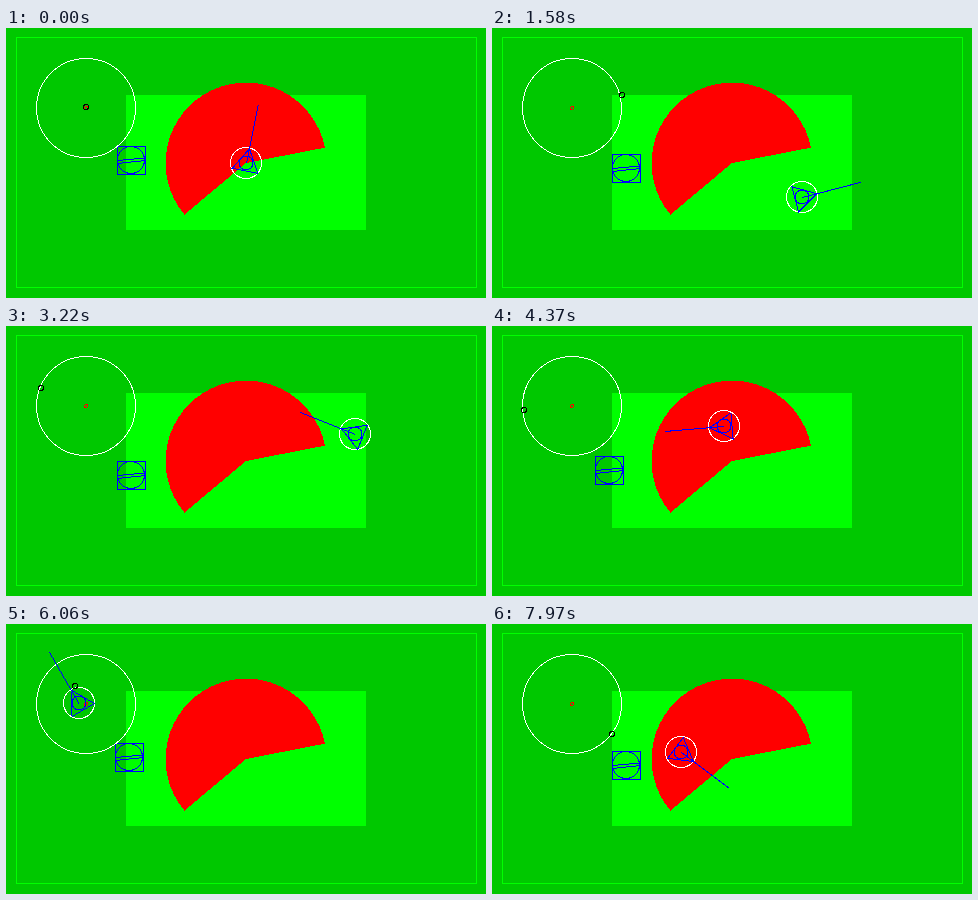
An HTML page for the animation above (8 s loop, 480x270 px).

```html
<!DOCTYPE html>
<html lang="en">
<head>
<meta charset="utf-8">
<title>Joystick steering</title>
<style>
  html, body { margin: 0; width: 100%; height: 100%; overflow: hidden; background: #00c800; }
  svg { display: block; width: 480px; height: 270px; shape-rendering: crispEdges; }
  .line { fill: none; stroke-width: 1; }
  .blue { stroke: #00f; }
  .white { stroke: #fff; }
</style>
</head>
<body>
<svg viewBox="0 0 480 270">
  <rect width="480" height="270" fill="#00c800"/>
  <rect x="120" y="67" width="240" height="135" fill="#0f0"/>
  <rect class="line" x="10.5" y="9.5" width="460" height="250" stroke="#0f0"/>
  <path id="pie" fill="#f00"/>
  <g id="orbiter" class="line blue">
    <rect x="-14" y="-14" width="28" height="28"/>
    <circle cx="-.5" cy="-.5" r="13.5"/>
    <path d="M-14 0L14 -2.5M-14 3L14 0"/>
  </g>
  <circle class="line white" cx="80" cy="80" r="49.5"/>
  <circle class="line" cx="80" cy="80" r="1.5" stroke="#f00"/>
  <g id="vehicle" class="line blue">
    <circle class="white" r="15.5"/>
    <circle r="7"/>
    <path id="heading" d="M15 0L-7.5 13V-13ZM0 0H60"/>
  </g>
  <circle id="knob" class="line" r="2.5" stroke="#000"/>
</svg>
<script>
const LOOP = 8000;
const GAIN = 0.00213; // vehicle px per ms for each px of stick
const HOME = { x: 240, y: 135 };

// Stick gestures: time, x, y. The vehicle's route follows from these alone.
const stick = [
  [0, 0.2, -1], [50, 0.2, -1], [300, 9, 22], [810, 10, 18],
  [1200, 40, 6], [1580, 50, -13], [2430, 18, -13], [2820, -13, -29],
  [3220, -45, -18], [3600, -48.5, -3.4], [4370, -48, 4], [4900, -51, 6],
  [5300, -50, 0.6], [5760, -40, -30], [6200, 3, -13], [6600, 24, -4],
  [6890, 31, 4], [7150, 39, 28], [7420, 40, 30], [LOOP, 40, 30]
];

const $ = id => document.getElementById(id);
const mix = (a, b, u) => a + (b - a) * u;
const radians = deg => deg * Math.PI / 180;
const move = (el, x, y) => el.setAttribute('transform', `translate(${x} ${y})`);

// Stick position at time t, and the vehicle position it has led to.
function steer(t) {
  let { x, y } = HOME, sx, sy;
  for (let i = 1; i < stick.length && stick[i - 1][0] <= t; i++) {
    const [t0, x0, y0] = stick[i - 1], [t1, x1, y1] = stick[i];
    const span = Math.min(t, t1) - t0, u = span / (t1 - t0);
    sx = mix(x0, x1, u);
    sy = mix(y0, y1, u);
    x += GAIN * span * (x0 + sx) / 2;
    y += GAIN * span * (y0 + sy) / 2;
  }
  return { x, y, sx, sy };
}

function sector(cx, cy, r, from, to) {
  const at = deg => `${cx + r * Math.cos(radians(deg))} ${cy + r * Math.sin(radians(deg))}`;
  return `M${cx} ${cy}L${at(from)}A${r} ${r} 0 ${to - from > 180 ? 1 : 0} 1 ${at(to)}Z`;
}

function draw(t) {
  const { x, y, sx, sy } = steer(t);
  const angle = Math.atan2(sy, sx) * 180 / Math.PI;
  move($('vehicle'), Math.round(x), Math.round(y));
  $('heading').setAttribute('transform', `translate(.5 .5) rotate(${angle})`);
  move($('knob'), Math.round(80 + sx), Math.round(80 + sy));

  const orbit = radians(t * 0.057 - 93);
  move($('orbiter'),
    Math.floor(125.7 + 8.5 * Math.cos(orbit)) + 0.5,
    Math.floor(141.4 + 8.5 * Math.sin(orbit)) + 0.5);
}

$('pie').setAttribute('d', sector(240, 135, 80.4, 140, 349));

const start = performance.now();
function tick() {
  draw((performance.now() - start) % LOOP);
  requestAnimationFrame(tick);
}
tick();
</script>
</body>
</html>
```
